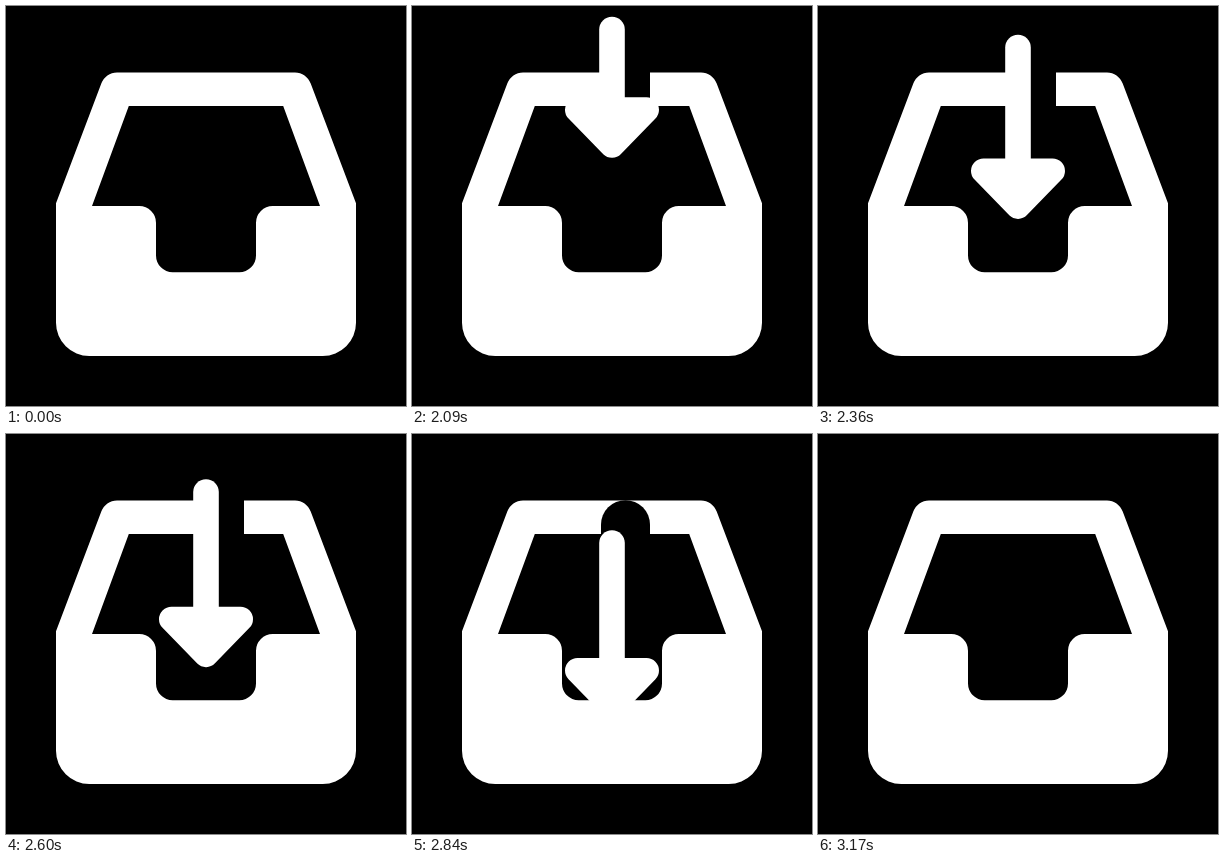
An HTML page that plays this animation: 400 by 400 pixels, repeating every 3.26 s.

```html
<!DOCTYPE html>
<html lang="en">
<head>
<meta charset="utf-8">
<title>Inbox</title>
<style>
  html, body { margin: 0; width: 100%; height: 100%; overflow: hidden; background: #000; }
  svg { display: block; width: 100%; height: 100%; }
</style>
</head>
<body>
<svg viewBox="0 0 400 400" fill="#fff">
  <clipPath id="aboveTray"><path d="M0 0H400V300H0Z"/></clipPath>

  <path id="rim" fill-rule="evenodd" d="M50 202V197.2L95.3 77.5C97.8 71 104 66.5 111 66.5H289C296 66.5 302.2 71 304.7 77.5L350 197.2V202Z
    M122.8 100L86 200V202H314V200L277.2 100Z"/>
  <path id="gap" fill="none" stroke="#000" stroke-width="49" stroke-linecap="round"/>
  <path id="tray" d="M50 200H133.3A16.7 16.7 0 0 1 150 216.7V249.5A16.7 16.7 0 0 0 166.7 266.2H233.3A16.7 16.7 0 0 0 250 249.5V216.7A16.7 16.7 0 0 1 266.7 200H350V316.7A33.3 33.3 0 0 1 316.7 350H83.3A33.3 33.3 0 0 1 50 316.7Z"/>

  <g id="arrow" clip-path="url(#aboveTray)" stroke="#fff" stroke-linecap="round" stroke-linejoin="round">
    <path id="shaft" stroke-width="25.6"/>
    <path id="head" stroke-width="25"/>
  </g>
</svg>
<script>
  const LOOP = 3260, START = 2030, STEP = 30, STEPS = 33;
  const [gap, arrow, shaft, head] = ['gap', 'arrow', 'shaft', 'head'].map(id => document.getElementById(id));

  // Slow drift, then a steep fall into the tray.
  const tailAt = k => 6.6 + 2.02 * k + 35 * (Math.max(0, k - 16) / 11) ** 4;
  // The shaft shoots out to its full length.
  const lengthAt = k => 128 - 80 * Math.exp(-0.263 * k);

  function render(time) {
    const k = Math.floor((time % LOOP - START) / STEP);
    const visible = k >= 0 && k < STEPS;
    arrow.style.display = gap.style.display = visible ? '' : 'none';
    if (!visible) return;

    const tail = tailAt(k);
    const top = tail + lengthAt(k);
    gap.setAttribute('d', `M213.5 ${tail - 5.5}V${tail + 180}`);
    shaft.setAttribute('d', `M200 ${tail + 12.8}V${top + 20}`);
    head.setAttribute('d', `M165.5 ${top + 12.5}H234.5L200 ${top + 48}Z`);
  }

  const origin = performance.now();
  function tick() {
    render(performance.now() - origin);
    requestAnimationFrame(tick);
  }
  tick();
</script>
</body>
</html>
```
